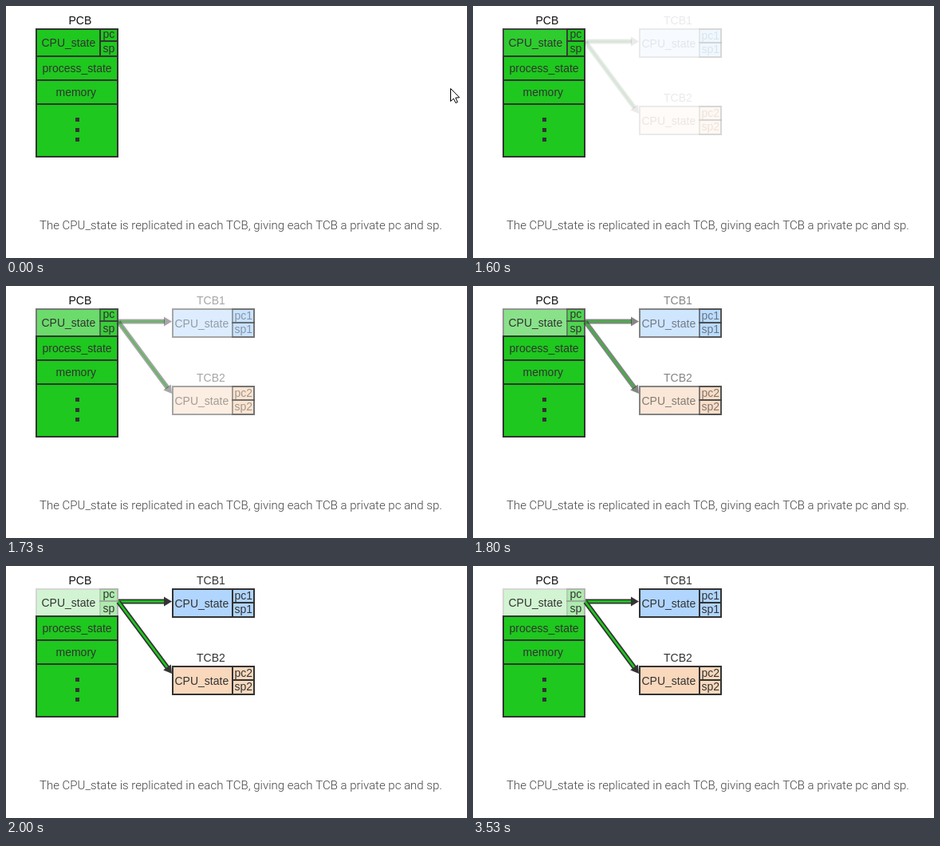
Animation, 578 px wide and 316 px high, one loop 3.87 s. Source, as an HTML page with a canvas:

```html
<!DOCTYPE html>
<html lang="en">
<head>
<meta charset="utf-8">
<title>PCB and TCBs</title>
<style>
html, body { margin: 0; width: 100%; height: 100%; overflow: hidden; background: #fff; }
canvas { display: block; }
</style>
</head>
<body>
<canvas id="stage" width="578" height="316"></canvas>
<script>
const ctx = document.getElementById('stage').getContext('2d');
const LOOP = 3870, STEP = 400 / 6;
const DARK = '#333', GREEN = '#1ec81e', BLUE = '#b0d5ff', PEACH = '#f9d8bc';
const LABEL = '14px "Liberation Sans", Arial, sans-serif';
const CAPTION = '300 15px Roboto, sans-serif';

function text(str, x, y, font = LABEL, color = DARK) {
  ctx.font = font;
  ctx.fillStyle = color;
  ctx.fillText(str, x, y);
}

// x, y, w, h follow the middle of the 2px border
function cell(x, y, w, h, fill) {
  ctx.fillStyle = fill;
  ctx.fillRect(x + 1, y + 1, w - 2, h - 2);
  ctx.strokeStyle = DARK;
  ctx.lineWidth = 2;
  ctx.strokeRect(x, y, w, h);
}

function line(len, width, color) {
  ctx.fillStyle = color;
  ctx.fillRect(0, -width / 2, len, width);
}

function arrow(x1, y1, x2, y2) {
  const len = Math.hypot(x2 - x1, y2 - y1);
  ctx.save();
  ctx.translate(x1, y1);
  ctx.rotate(Math.atan2(y2 - y1, x2 - x1));
  line(len - 9, 6, DARK);
  line(len - 9, 2.6, GREEN);
  ctx.fillStyle = DARK;
  ctx.beginPath();
  ctx.moveTo(len, 0);
  ctx.lineTo(len - 10, -6);
  ctx.lineTo(len - 10, 6);
  ctx.fill();
  ctx.restore();
}

function thread(n, y, fill) {
  text('TCB' + n, 239, y - 6);
  cell(209, y, 102, 35, fill);
  cell(284, y, 27, 17, fill);
  cell(284, y + 17, 27, 18, fill);
  text('CPU_state', 211.5, y + 23);
  text('pc' + n, 286.5, y + 13);
  text('sp' + n, 286.5, y + 30);
}

function process(fade) {
  ctx.globalAlpha = 1 - 0.8 * fade;
  cell(38, 29, 102, 34, GREEN);
  cell(118, 29, 22, 15, GREEN);
  cell(118, 44, 22, 19, GREEN);
  ctx.globalAlpha = 1;
  cell(38, 63, 102, 30, GREEN);
  cell(38, 93, 102, 30, GREEN);
  cell(38, 123, 102, 66, GREEN);
  text('PCB', 78.5, 23, LABEL, '#111');
  text('CPU_state', 44.5, 51);
  text('pc', 121.5, 40);
  text('sp', 121.5, 58);
  text('process_state', 45.5, 83);
  text('memory', 62.5, 113);
  ctx.fillStyle = DARK;
  for (const y of [140, 153, 165]) ctx.fillRect(87, y, 5, 5);
}

function cursor(x, y) {
  const pts = [[0, 0], [0, 16], [3.7, 12.6], [6.3, 18], [8.7, 17], [6.2, 11.6], [11, 11.2]];
  ctx.beginPath();
  for (const [dx, dy] of pts) ctx.lineTo(x + 0.5 + dx, y + 0.5 + dy);
  ctx.closePath();
  ctx.fillStyle = '#fff';
  ctx.fill();
  ctx.strokeStyle = '#000';
  ctx.lineWidth = 1;
  ctx.stroke();
}

function pointer(t) {
  if (t < 70) cursor(557, 103);
  else if (t >= 3330 && t < 3530) {
    const k = Math.floor((t - 3330 + 5) / STEP);
    cursor(54 + 31 * k, 40 + 128 * k);
  }
}

function draw(t) {
  const k = Math.floor((t - 1600 + 5) / STEP);
  const fade = t < 1600 ? 0 : Math.min(1, 0.1 + k / 6);
  ctx.globalAlpha = 1;
  ctx.fillStyle = '#fff';
  ctx.fillRect(0, 0, 578, 316);
  process(fade);
  ctx.globalAlpha = fade;
  thread(1, 29, BLUE);
  thread(2, 126, PEACH);
  arrow(141, 44.5, 208, 44.5);
  arrow(141, 45, 208, 135);
  ctx.globalAlpha = 1;
  text('The CPU_state is replicated in each TCB, giving each TCB a private pc and sp.',
    42, 280, CAPTION, '#444');
  pointer(t);
}

function frame() {
  draw(performance.now() % LOOP);
  requestAnimationFrame(frame);
}
frame();
</script>
</body>
</html>
```
